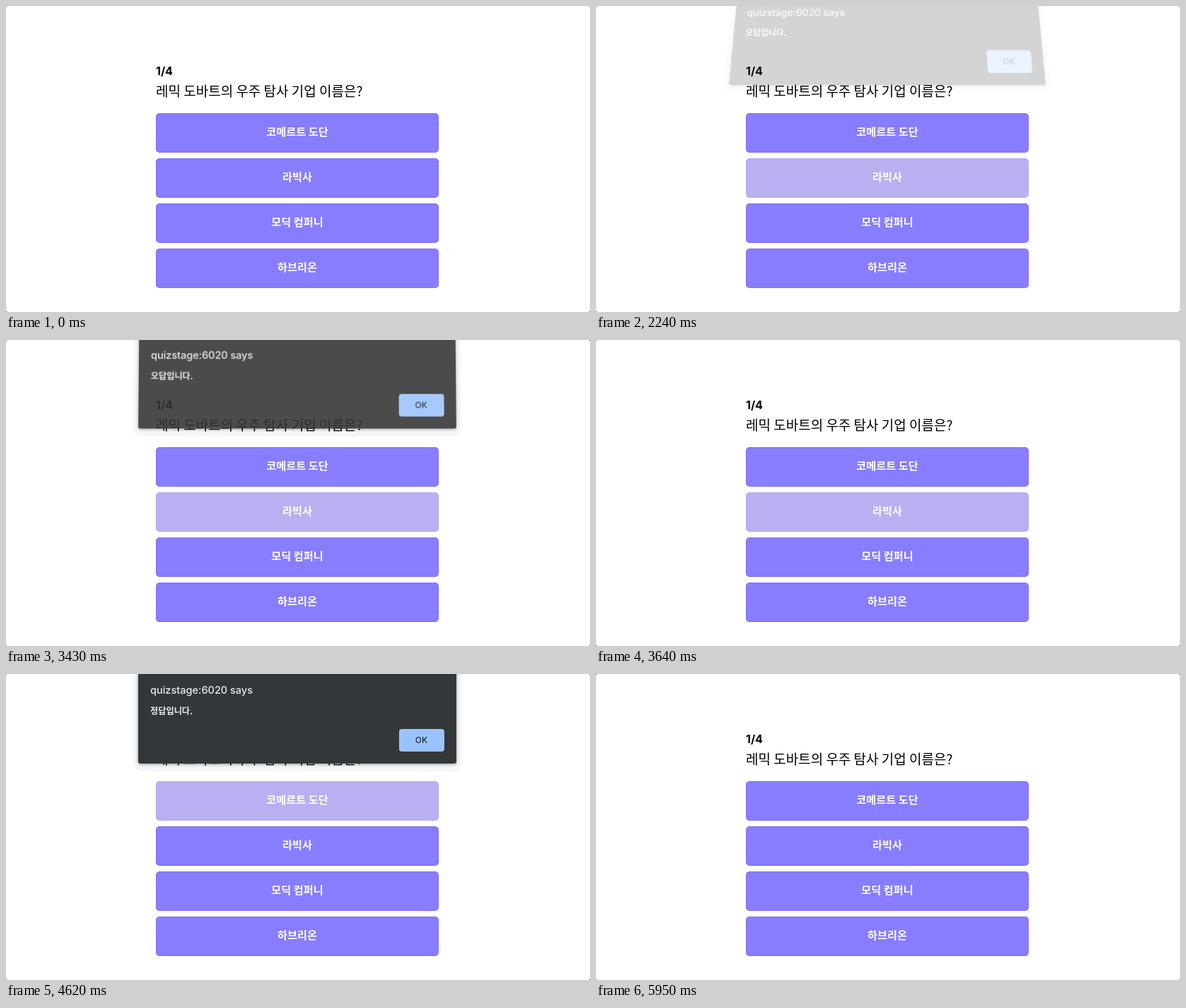
An HTML page with a canvas for the animation above (6.09 s loop, 826 px wide and 434 px high).

```html
<!DOCTYPE html>
<html lang="ko">
<head>
<meta charset="utf-8">
<title>Quiz</title>
<style>
  html, body { margin: 0; width: 100%; height: 100%; overflow: hidden; background: #fff; }
  #stage { position: relative; width: 100%; height: 100%; overflow: hidden; contain: strict; }
  canvas { position: absolute; left: 0; top: 0; }
  #dialog { transform-origin: 412px 127px; }
</style>
</head>
<body>
<div id="stage">
  <canvas id="page" width="826" height="434"></canvas>
  <canvas id="dialog" width="826" height="144"></canvas>
</div>
<script>
const LOOP = 6090, STEP = 70;
const KOREAN = '"Noto Sans CJK KR", "Noto Sans CJK", sans-serif';
const LATIN = 'Inter, sans-serif';
const BASE = [136, 125, 255], HOVER = [184, 176, 241];
const BASE_EDGE = [122, 110, 246], HOVER_EDGE = [179, 171, 236];
const ANSWERS = ['코메르트 도단', '라빅사', '모딕 컴퍼니', '하브리온'];
const WRONG = { text: '오답입니다.', fill: '#343435', opens: 2170, closes: 3290 };
const RIGHT = { text: '정답입니다.', fill: '#343739', opens: 4340, closes: 5110 };

const dialogCanvas = document.getElementById('dialog');
const page = document.getElementById('page').getContext('2d');
const dialog = dialogCanvas.getContext('2d');

const ramp = (t, from, to) => Math.min(1, Math.max(0, (t - from) / (to - from)));

function box(ctx, x, y, w, h, r, fill) {
  ctx.fillStyle = fill;
  ctx.beginPath();
  ctx.roundRect(x, y, w, h, r);
  ctx.fill();
}

function label(ctx, text, x, y, font, fill, align = 'left') {
  ctx.font = font;
  ctx.fillStyle = fill;
  ctx.textAlign = align;
  ctx.fillText(text, x, y);
}

function mix(a, b, k) {
  return `rgb(${a.map((v, i) => Math.round(v + (b[i] - v) * k)).join(',')})`;
}

function drawPage(hover) {
  box(page, 0, 0, 826, 434, 0, '#777');
  box(page, 0, 0, 826, 434, 3, '#fff');
  label(page, '1/4', 212, 98, `700 16px ${LATIN}`, '#000');
  label(page, '레믹 도바트의 우주 탐사 기업 이름은?', 212, 127.5, `400 19px ${KOREAN}`, '#000');
  ANSWERS.forEach((text, i) => {
    const y = 152 + i * 64, k = hover[i] || 0;
    box(page, 212, y, 400, 56, 5, mix(BASE_EDGE, HOVER_EDGE, k));
    box(page, 213, y + 1, 398, 54, 4, mix(BASE, HOVER, k));
    label(page, text, 412, y + 32, `700 15.2px ${KOREAN}`, '#fff', 'center');
  });
}

function drawDialog({ text, fill }) {
  dialog.clearRect(0, 0, 826, 144);
  box(dialog, 180, -20, 464, 158, 12, 'rgba(0,0,0,.04)');
  dialog.shadowColor = 'rgba(0,0,0,.4)';
  dialog.shadowBlur = 4;
  dialog.shadowOffsetY = 1;
  box(dialog, 187, -20, 450, 147, 3, fill);
  dialog.shadowColor = 'transparent';
  label(dialog, 'quizstage:6020 says', 204, 28, `500 14.5px ${LATIN}`, '#e8eaed');
  label(dialog, text, 204, 56.5, `700 12.2px ${KOREAN}`, '#e8eaed');
  box(dialog, 556, 78, 64, 32, 4, '#9ac3fb');
  label(dialog, 'OK', 587.5, 98, `500 12px ${LATIN}`, '#202a38', 'center');
}

// away: 0 = fully open, 1 = tilted back and invisible
function poseDialog(away) {
  const lean = away ** 1.2;
  const sx = 1 - 0.0064 * lean, sy = 1 + 0.043 * lean, tilt = -0.00058 * lean;
  dialogCanvas.style.opacity = 1 - away;
  dialogCanvas.style.transform = lean
    ? `translateY(${-19.7 * lean}px) matrix3d(${sx},0,0,0, 0,${sy},0,${tilt}, 0,0,1,0, 0,0,0,1)`
    : 'none';
}

function awayAt(t, { opens, closes }) {
  return t > closes
    ? ramp(t, closes, closes + 350) ** 2.4
    : 1 - ramp(t, opens, opens + 210) ** 1.4;
}

let shown = null;
function render(t) {
  const swap = ramp(t, 3710, 3850);
  drawPage([
    swap * (1 - ramp(t, 5460, 5670)),
    ramp(t, 1540, 1750) * (1 - swap)
  ]);

  const alert = t < 4000 ? WRONG : RIGHT;
  if (alert !== shown) drawDialog(shown = alert);
  poseDialog(awayAt(t, alert));
}

const start = performance.now();
function tick() {
  const t = (performance.now() - start) % LOOP;
  render(Math.floor(t / STEP) * STEP);
  requestAnimationFrame(tick);
}
tick();
</script>
</body>
</html>
```
